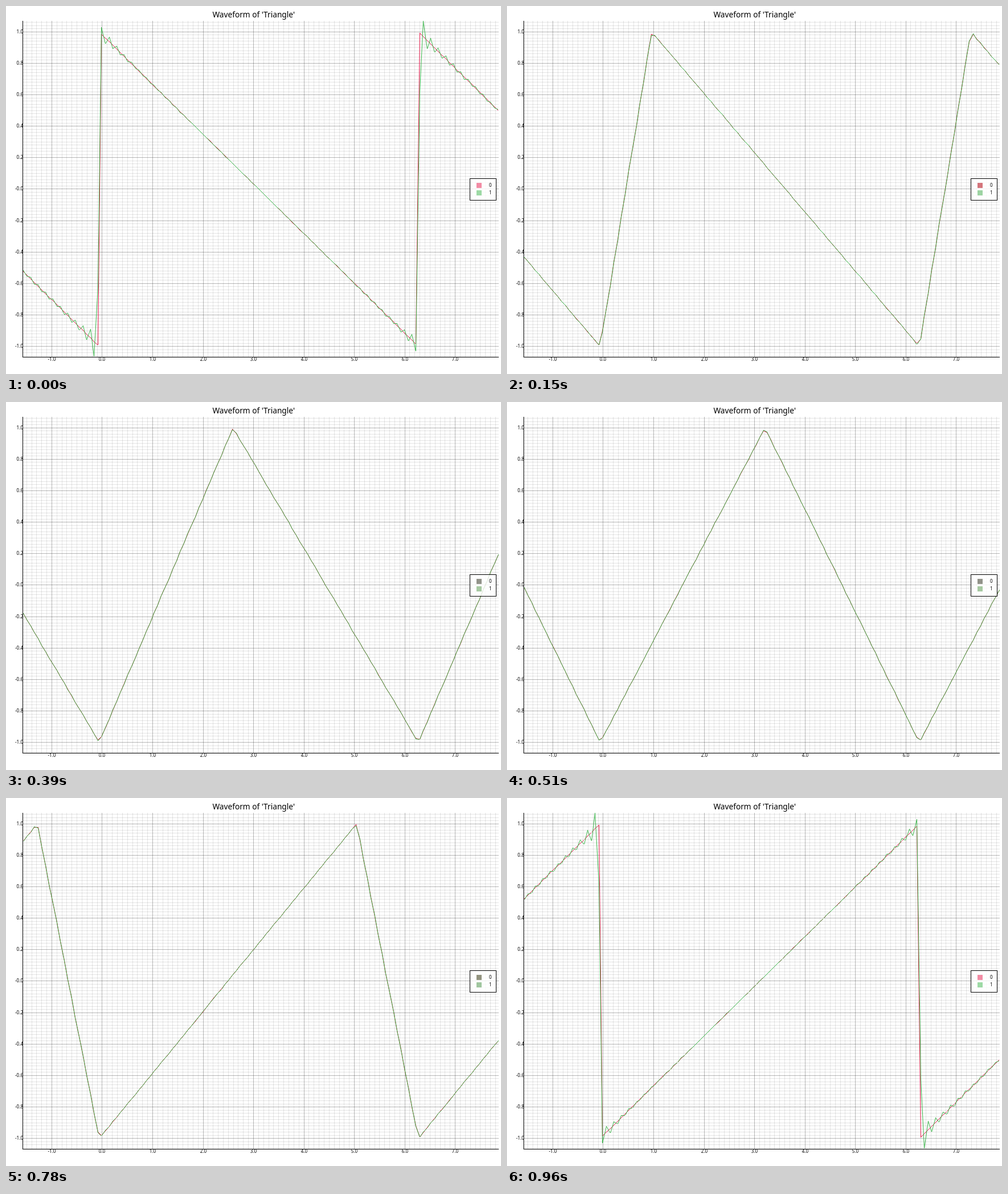
These frames come from a looping animation (869 px wide and 645 px high, 0.99 s). An HTML page with a canvas:

```html
<!DOCTYPE html>
<html lang="en">
<head>
<meta charset="utf-8">
<title>Waveform</title>
<style>
  html, body { margin: 0; width: 869px; height: 645px; overflow: hidden; background: #fff; }
  svg, canvas { position: absolute; left: 0; top: 0; }
  text { font: 8.07px "Noto Sans", "Open Sans", sans-serif; fill: #000; }
  .title { font-size: 13.7px; text-anchor: middle; }
  .x { text-anchor: middle; }
  .y { text-anchor: end; }
  path { fill: none; stroke: #000; shape-rendering: crispEdges; }
  .light { stroke-opacity: .1; }
  .bold { stroke-opacity: .2; }
</style>
</head>
<body>
<svg id="chart" width="869" height="645">
  <text class="title" x="434.7" y="20">Waveform of 'Triangle'</text>
</svg>
<canvas id="plot" width="869" height="645"></canvas>
<svg width="869" height="645">
  <rect x="814.5" y="302.5" width="46" height="38" fill="#fff" fill-opacity=".8" stroke="#000"/>
  <rect id="key0" x="826" y="310" width="9" height="9"/>
  <rect id="key1" x="826" y="323" width="9" height="9"/>
  <text x="848" y="317">0</text>
  <text x="848" y="330">1</text>
</svg>
<script>
const TAU = 2 * Math.PI;
const STEP = 30, FRAMES = 33;
const SAMPLES = 128, HARMONICS = 42;
const LEFT = 30, RIGHT = 864, TOP = 26, BOTTOM = 614;
const X_MIN = -1.5697, X_MAX = 7.851, Y_MAX = 1.0664;
const RED = [230, 25, 75], GREEN = [60, 180, 75];

const $ = id => document.getElementById(id);
const chart = $('chart');
const ctx = $('plot').getContext('2d');

// Whole pixels: x counts from the left edge, y from the bottom edge.
const across = r => LEFT + Math.floor((RIGHT - LEFT) * r + 1e-3);
const px = x => across((x - X_MIN) / (X_MAX - X_MIN));
const py = y => BOTTOM - Math.floor((BOTTOM - TOP) * (y + Y_MAX) / (2 * Y_MAX) + 1e-3);

function add(tag, attrs, text = '') {
  const el = document.createElementNS('http://www.w3.org/2000/svg', tag);
  for (const k in attrs) el.setAttribute(k, attrs[k]);
  el.textContent = text;
  chart.append(el);
}

function grid(cls, from, to, unit, line) {
  let d = '';
  for (let i = from; i <= to; i++) d += line(i * unit);
  add('path', { class: cls, d });
}
const vLine = x => `M${px(x) + .5} ${TOP}V${BOTTOM + 1}`;
const hLine = y => `M${LEFT} ${py(y) + .5}H${RIGHT + 1}`;

function drawChart() {
  grid('light', -15, 78, .1, vLine);
  grid('light', -53, 53, .02, hLine);
  grid('bold', -1, 7, 1, vLine);
  grid('bold', -5, 5, .2, hLine);
  add('path', { d: `M${LEFT - .5} ${TOP}V${BOTTOM + 1.5}H${RIGHT + 1}` });
  for (let i = -1; i <= 7; i++)
    add('text', { class: 'x', x: px(i) + .5, y: 622 }, i.toFixed(1));
  for (let i = -5; i <= 5; i++)
    add('text', { class: 'y', x: 30, y: py(i / 5) + 3 }, i ? (i / 5).toFixed(1) : '-0.0');
}

// Rises from -1 to 1 over [0, peak], falls back over the rest of the period.
function triangle(phase, peak) {
  const t = (phase + TAU) % TAU;
  return t < peak ? 2 * t / peak - 1 : 1 - 2 * (t - peak) / (TAU - peak);
}

function fourier(phase, peak) {
  let sum = 0;
  for (let n = 1; n <= HARMONICS; n++)
    sum += (Math.cos(n * (phase - peak)) - Math.cos(n * phase)) / (n * n);
  return sum * 4 / (peak * (TAU - peak));
}

// Anti-aliased line that splits each step over two neighbouring pixels.
function segment(x0, y0, x1, y1, rgb) {
  const steep = Math.abs(y1 - y0) > Math.abs(x1 - x0);
  if (steep) [x0, y0, x1, y1] = [y0, x0, y1, x1];
  if (x0 > x1) [x0, y0, x1, y1] = [x1, y1, x0, y0];
  const slope = (y1 - y0) / (x1 - x0 || 1);
  const dot = (u, v, a) => {
    if (a < .004) return;
    ctx.fillStyle = `rgba(${rgb},${a})`;
    steep ? ctx.fillRect(v, u, 1, 1) : ctx.fillRect(u, v, 1, 1);
  };
  for (let u = x0; u < x1; u++) {
    const v = y0 + slope * (u - x0), row = Math.floor(v);
    dot(u, row, 1 + row - v);
    dot(u, row + 1, v - row);
  }
}

function plot(wave, peak, rgb) {
  let lastX, lastY;
  for (let k = 0; k < SAMPLES; k++) {
    const phase = -TAU / 4 + 1.5 * TAU * (k + 1) / SAMPLES;
    const x = across(k / (SAMPLES - 1));
    const y = py(wave(phase, peak));
    if (k) segment(lastX, lastY, x, y, rgb);
    [lastX, lastY] = [x, y];
  }
}

// Legend tints: first step they apply to, then both colours.
const TINTS = [
  [0, '#f28ca5', '#9dd9a5'],
  [2, '#d4757c', '#9dd3a2'],
  [7, '#92938a', '#9dd3a2'],
  [13, '#92938a', '#a7c9a2'],
  [20, '#d39a97', '#9dcb9f'],
  [24, '#92937f', '#a0c69f'],
  [30, '#f28ca5', '#9dd9a5']
];

function drawFrame(i) {
  // The symmetric wave sits between two runs of sixteen.
  const duty = (i < 16 ? i : i > 16 ? i - 1 : 15.5) / 31;
  const peak = TAU * Math.min(Math.max(duty, 1e-5), 1 - 1e-5);
  ctx.clearRect(0, 0, 869, 645);
  plot(triangle, peak, RED);
  plot(fourier, peak, GREEN);
  const tint = TINTS.filter(t => t[0] <= i).pop();
  $('key0').setAttribute('fill', tint[1]);
  $('key1').setAttribute('fill', tint[2]);
}

drawChart();
const start = performance.now();
let shown = -1;
function tick() {
  const i = Math.floor((performance.now() - start) / STEP) % FRAMES;
  if (i !== shown) drawFrame(shown = i);
  requestAnimationFrame(tick);
}
tick();
</script>
</body>
</html>
```
